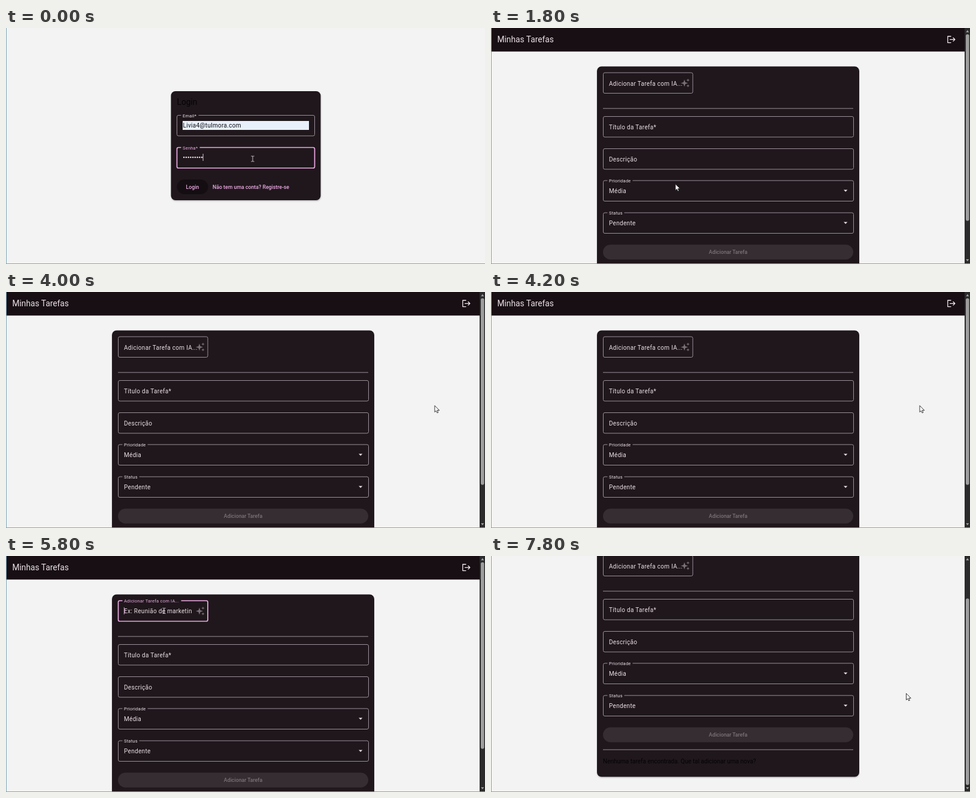
An HTML page for the animation above (8000 ms loop, 800 by 396 pixels).

```html
<!DOCTYPE html>
<html lang="pt-BR">
<head>
<meta charset="utf-8">
<title>Minhas Tarefas</title>
<style>
html, body { margin: 0; width: 100%; height: 100%; overflow: hidden; background: #f3f3f4; }
svg { display: block; width: 100%; height: 100%; }
text { font-family: Roboto, sans-serif; white-space: pre; }
.ui text { font-family: "Open Sans", "Noto Sans", sans-serif; }
</style>
</head>
<body>
<svg id="stage" viewBox="0 0 800 396"></svg>
<script>
const LOOP = 8000, STEP = 200;
const CARD = '#1f171c', BAR = '#170f13', PINK = '#eeaae4', LINE = '#9b8f97', INK = '#ebdfe6';
const EMAIL = 'Livia4@tulmora.com';

const text = (x, y, str, size = 10, fill = INK, more = '') =>
  `<text x="${x}" y="${y}" font-size="${size}" fill="${fill}" ${more}>${str}</text>`;
const rect = (x, y, w, h, r, fill, more = '') =>
  `<rect x="${x}" y="${y}" width="${w}" height="${h}" rx="${r}" fill="${fill}" ${more}/>`;
const path = (d, stroke, width = 1, fill = 'none') =>
  `<path d="${d}" fill="${fill}" stroke="${stroke}" stroke-width="${width}" stroke-linecap="round" stroke-linejoin="round"/>`;
const circle = (x, y, r, fill, more = '') => `<circle cx="${x}" cy="${y}" r="${r}" fill="${fill}" ${more}/>`;
const group = (id, body, more = '') => `<g id="${id}" ${more}>${body}</g>`;
const spaced = 'letter-spacing=".31"', bold = 'font-weight="500"';
const mid = 'text-anchor="middle"';

// Outlined box; a floating label cuts a notch into its top edge.
const box = (x, y, w, color = LINE, width = 1) =>
  rect(x, y, w, 34.5, 2.5, 'none', `stroke="${color}" stroke-width="${width}"`);
const floating = (x, y, label, notch, color = INK) =>
  rect(x + 7, y - 1.5, notch, 3, 0, CARD) + text(x + 9.5, y + 3, label, 7.5, color, 'letter-spacing=".23"');
const field = (y, label) => box(187.5, y, 418) + text(197, y + 21.5, label, 10, INK, spaced);
const select = (y, label, value, notch) =>
  box(187.5, y, 418) + floating(187.5, y, label, notch) + text(197, y + 21, value, 10, INK, spaced) +
  `<path d="M589 ${y + 15.5}h6.4l-3.2 3.3z" fill="${INK}"/>`;
const divider = y => rect(187, y, 418, 1, 0, LINE);
const dots = (x, y, step, r, n) =>
  Array.from({ length: n }, (_, i) => circle(x + i * step, y, r, INK)).join('');
const spark = (x, y, r) => {
  const k = r * .25;
  return `M${x} ${y - r}l${k} ${r - k} ${r - k} ${k} ${k - r} ${k} ${-k} ${r - k} ${-k} ${k - r} ${k - r} ${-k} ${r - k} ${-k}z`;
};

const login =
  rect(276, 107.5, 250, 183, 7.5, '#000', 'opacity=".22" filter="url(#soft)"') +
  rect(275.5, 106, 250, 183, 7.5, CARD) +
  text(285.5, 129, 'Login', 13.75, '#050304') +
  box(285.5, 146.5, 230) + floating(285.5, 146.5, 'Email*', 29) +
  rect(295, 156, 211, 15, 0, '#e8f0fb') + text(295.5, 167, EMAIL, 10, '#101014', spaced) +
  group('pwIdle', box(285.5, 200.5, 230)) +
  group('pwFocus', box(285.5, 200.5, 230, PINK, 1.7)) +
  floating(285.5, 200.5, 'Senha*', 31, PINK) +
  group('pwDots', dots(297.2, 217, 3.74, 1.25, 11)) +
  rect(0, 211, .9, 12, 0, INK, 'id="pwCaret"') +
  rect(285.5, 254, 52, 25, 12.5, '#140e12', 'id="loginBtn"') +
  text(311.5, 269.8, 'Login', 8.75, PINK, `${bold} ${mid} id="loginText"`) +
  text(345, 269.8, 'Não tem uma conta? Registre-se', 8.75, PINK, bold);

const page =
  rect(0, 0, 791, 39.5, 0, BAR) +
  text(10.5, 24, 'Minhas Tarefas', 13.75, INK) +
  path('M768 14h-5.2v10.6h5.2M766.5 19.3h8M772 16.5l2.8 2.8-2.8 2.8', '#f4e9ef', 1.3) +
  rect(177, 66, 438, 382, 7.5, '#000', 'opacity=".2" filter="url(#soft)"') +
  rect(177, 64.5, 438, 382, 7.5, CARD) +
  group('aiIdle', box(187.5, 75, 149.5) + text(197, 96.7, 'Adicionar Tarefa com IA...', 10, INK, spaced)) +
  group('aiFocus', box(187.5, 75, 149.5, PINK, 1.7) +
    floating(187.5, 75, 'Adicionar Tarefa com IA...', 98, PINK) +
    text(197, 95.5, 'Ex: Reunião de marketin', 10, INK, spaced) +
    rect(196.8, 86, .9, 12, 0, PINK, 'id="aiCaret"')) +
  `<path d="${spark(323, 92.5, 6)}${spark(329, 87.5, 2.8)}${spark(329, 97, 2.8)}" fill="#7a7077"/>` +
  divider(134.5) +
  field(148.5, 'Título da Tarefa*') + field(202.5, 'Descrição') +
  select(256, 'Prioridade', 'Média', 42) + select(310, 'Status', 'Pendente', 28) +
  rect(187, 363.5, 418, 25, 12.5, '#352d32') +
  text(396, 379.2, 'Adicionar Tarefa', 8.75, '#7b7378', `${bold} ${mid}`) +
  divider(400.5) +
  text(187, 424, 'Nenhuma tarefa encontrada. Que tal adicionar uma nova?', 10, '#050304');

const scrollbar =
  rect(791, 0, 9, 396, 0, '#2b2b2c') +
  '<path d="M793.3 7.2l2.5-3.6 2.5 3.6zM793.3 388l2.5 3.6 2.5-3.6z" fill="#a0a0a0"/>' +
  rect(793, 10.5, 5.6, 313, 2.8, '#9e9e9e', 'id="thumb"');

const cyclist =
  circle(666, 54, 7.2, 'none', 'stroke="#a9cbf5" stroke-width="1.5"') +
  circle(693.5, 54, 7.2, 'none', 'stroke="#a9cbf5" stroke-width="1.5"') +
  path('M666 54l6-12h16l-9 13zM672 42l7 13M693.5 54l-6-15 4-1', '#5c93dc', 1.4) +
  path('M674 38l9 5-4 12M675 37l-2 8 4 8', '#3565ad', 3.2) +
  path('M683 29l3 8 5 1', '#c98a64', 2) +
  path('M675 36l7-10', '#35a55c', 9) +
  path('M678 29l4 2M674 35l4 2', '#d5efdc', 1) +
  circle(686, 22, 3.2, '#b87956') + path('M682.5 20.5q3-4 7-.5', '#e5e8ec', 2);

const userField = y => rect(605, y, 107, 22.5, 4, 'none', 'stroke="#777a7d" stroke-width=".9"');
const link = str => `<tspan fill="#8fb8f6" text-decoration="underline">${str}</tspan>`;
const popup =
  rect(524, -10, 202, 252, 7, '#000', 'opacity=".35" filter="url(#soft)"') +
  rect(524.5, -10, 200.5, 250, 7, '#202123', 'stroke="#3c3d3f" stroke-width=".8"') +
  path('M525 200.5h199.6v32.5a6.6 6.6 0 0 1-6.6 6.6h-186.4a6.6 6.6 0 0 1-6.6-6.6z', 'none', 0, '#2b2c2e') +
  rect(525, 200, 199.6, .8, 0, '#424446') +
  path('M551 46c17-9 37-7 53 3s30 14 54 14', '#56595c', 1) +
  rect(569, 23, 66.5, 21, 10.5, '#242629', 'stroke="#6d7074" stroke-width="1.2"') +
  Array.from({ length: 5 }, (_, i) => circle(579.3 + i * 11.4, 33.5, 3.8, '#6fa4dc')).join('') +
  path('M588 10l5-4 2 6-4 1z', '#e05248', 1, '#c9463f') +
  circle(650, 18, 3.4, '#4fa868') + path('M648.6 18l1 1.2 2-2.4', '#e5f3e8', .9) +
  rect(626.5, 48, 6, 6, 1, '#c5d3c4', 'transform="rotate(20 629.5 51)"') +
  cyclist +
  circle(704.5, 15, 8.5, '#3a3c3f') + path('M701.5 12l6 6m0-6l-6 6', '#d4d6d9', 1.1) +
  circle(544.5, 87.3, 4.2, '#4285f4') +
  text(564, 90.8, 'Salvar senha?', 9, '#eceef0', 'font-weight="600"') +
  text(537, 113.5, 'Nome de usuário', 7.1, '#e3e5e8') + text(537, 143.3, 'Senha', 7.1, '#e3e5e8') +
  userField(99.7) + userField(129.7) +
  text(611, 113.5, EMAIL, 7.1, '#e3e5e8') + dots(612.5, 141, 4.4, 1.15, 11) +
  path('M696.5 141q4.5-6 9 0q-4.5 6-9 0z', '#d0d3d6', 1.1) + circle(701, 141, 1.5, '#d0d3d6') +
  rect(618.3, 162.5, 44.5, 23.5, 11.75, '#a8c7fa') + rect(667.8, 162.5, 44.5, 23.5, 11.75, '#124877') +
  text(640.5, 177, 'Salvar', 7.3, '#0b3266', `font-weight="600" ${mid}`) +
  text(690, 177, 'Nunca', 7.3, '#d0e4fd', `font-weight="600" ${mid}`) +
  text(537, 214.3, 'As senhas são salvas no', 7.05, '#c8cacd') +
  text(618, 214.3, link('Organizador de Chaves do'), 7.05) +
  text(537, 227, link('Tolvra') + ' neste dispositivo.', 7.05, '#c8cacd');

const cursors =
  group('arrow', path('M0 0v10.5l2.4-2.2 1.7 3.6 1.8-.8-1.7-3.5h3.2z', '#222', .9, '#fff')) +
  group('beam', path('M-2.2-4.5h1.6l.6.6.6-.6h1.6M-2.2 4.5h1.6l.6-.6.6.6h1.6M0-4v8', '#d8d2d6', .9)) +
  group('hand', path('M-1 0q1-1.2 2 0v4.3l4.2 1q1.3.5 1 2l-.8 4.7h-5.6l-3.4-4.4q.8-1.5 2.6 0z', '#222', .8, '#fff'));

const stage = document.getElementById('stage');
stage.innerHTML =
  '<defs><filter id="soft" x="-10%" y="-10%" width="120%" height="120%"><feGaussianBlur stdDeviation="1.3"/></filter></defs>' +
  rect(0, 0, 800, 396, 0, '#f3f3f4') +
  group('login', login) + group('tasks', group('page', page) + scrollbar) +
  rect(0, 0, 1, 396, 0, '#7fa6b8') + rect(0, 395, 800, 1, 0, '#7fa6b8') +
  group('popup', popup, 'class="ui"') + group('cursor', cursors);

const el = {};
stage.querySelectorAll('[id]').forEach(n => el[n.id] = n);
const show = (id, on) => el[id].setAttribute('display', on ? 'inline' : 'none');
const set = (id, name, value) => el[id].setAttribute(name, value);

// time, x, y, pointer shape from then on
const moves = [
  [0, 412, 219.5, 'beam'], [800, 412, 219.5, 'beam'], [1000, 385, 239, 'arrow'],
  [1200, 328, 259, 'hand'], [1400, 308, 262, 'hand'], [1800, 308, 262, 'arrow'],
  [2200, 420, 190, 'arrow'], [2800, 704.5, 17, 'arrow'], [3200, 704.5, 17, 'arrow'],
  [3600, 716, 191, 'arrow'], [5000, 716, 191, 'arrow'], [5600, 264, 92, 'beam'],
  [6400, 264, 92, 'arrow'], [6800, 110, 170, 'arrow'], [7000, 330, 300, 'arrow'],
  [7400, 693.5, 231, 'arrow'], [LOOP, 693.5, 231, 'arrow']
];

function pointer(t) {
  const i = moves.findIndex(m => m[0] > t);
  const [t0, x0, y0, shape] = moves[i - 1], [t1, x1, y1] = moves[i];
  const p = (t - t0) / (t1 - t0), e = p * p * (3 - 2 * p);
  return [x0 + (x1 - x0) * e, y0 + (y1 - y0) * e, shape];
}

const blink = age => age % 1000 < 500;

function draw(now) {
  const t = Math.floor(now % LOOP / STEP) * STEP;
  const onLogin = t < 1800;
  show('login', onLogin);
  show('tasks', !onLogin);
  show('popup', t >= 2200 && t < 3200);

  const typed = t < 400 ? 9 : t < 600 ? 10 : 11, focused = t < 1600;
  [...el.pwDots.children].forEach((d, i) => d.setAttribute('display', i < typed ? 'inline' : 'none'));
  show('pwIdle', !focused);
  show('pwFocus', focused);
  show('pwCaret', focused && (t < 600 || blink(t - 600)));
  set('pwCaret', 'x', 295 + typed * 3.74);
  set('loginBtn', 'fill', t < 1200 ? '#140e12' : focused ? '#271b24' : '#4a3041');
  set('loginText', 'opacity', focused ? 1 : .85);

  const ai = t >= 5600 && t < 6800;
  show('aiIdle', !ai);
  show('aiFocus', ai);
  show('aiCaret', blink(t - 5600));

  const scroll = t < 7600 ? 0 : t < 7800 ? 38 : 76;
  set('page', 'transform', `translate(0 ${-scroll})`);
  set('thumb', 'y', 10.5 + scroll * .8);

  const [x, y, shape] = pointer(t);
  set('cursor', 'transform', `translate(${x} ${y})`);
  for (const s of ['arrow', 'beam', 'hand']) show(s, s === shape);
}

const start = performance.now();
function tick() {
  draw(performance.now() - start);
  requestAnimationFrame(tick);
}
tick();
</script>
</body>
</html>
```
